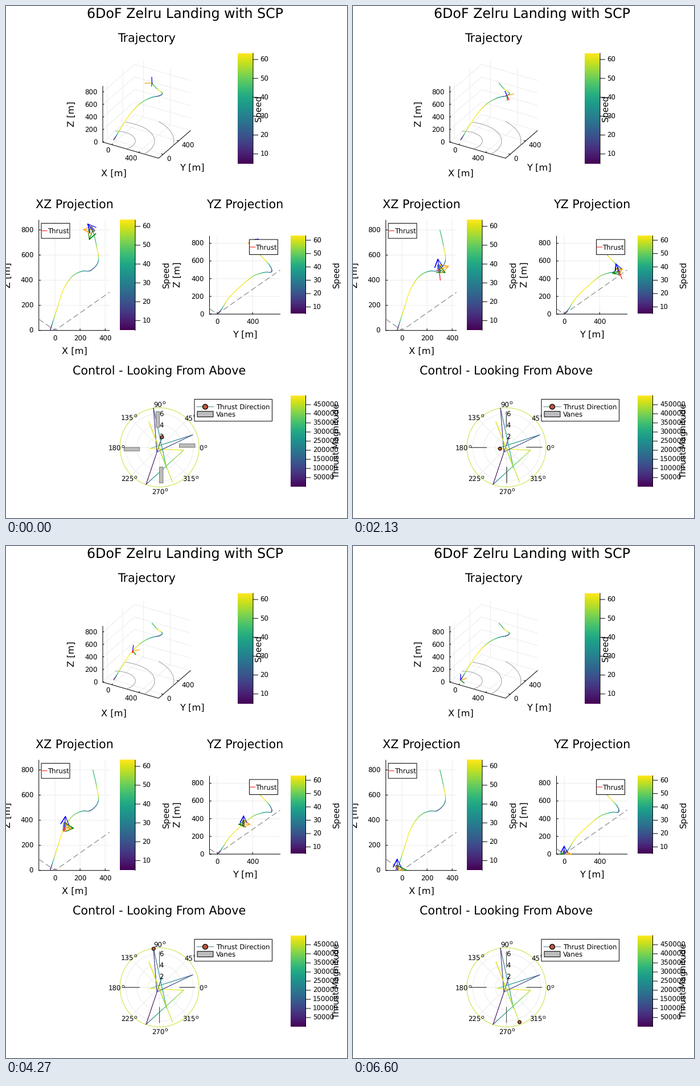
Recreate the animation shown at these times as a matplotlib script. Size 599 by 899 pixels, loop 6670 ms.

```python
import numpy as np
import matplotlib.pyplot as plt
from matplotlib.animation import FuncAnimation
from matplotlib.collections import LineCollection
from matplotlib.patches import Circle, Polygon, Rectangle

W, H, FRAMES = 599, 899, 100
LAST = FRAMES - 1
PX = 0.72  # points per pixel at 100 dpi
GRID, GRAY, RUST = "#ececec", "#bdbdbd", "#bf573d"
AXIS_LEN = 90

plt.rcParams.update({"font.family": "DejaVu Sans", "text.hinting": "none",
                     "path.snap": False})
fig = plt.figure(figsize=(W / 100, H / 100), dpi=100, facecolor="white")
ax = fig.add_axes([0, 0, 1, 1])
ax.axis("off")
viridis = plt.get_cmap("viridis")


# ---------- drawing helpers (pixel coordinates, y down) ----------
def line(xs, ys, color="black", width=1.0, z=2, **kw):
    return ax.plot(xs, ys, color=color, lw=width * PX, zorder=z, **kw)[0]


def text(x, y, s, size=11.8, ha="center", rot=0, z=6):
    """Place text with the middle of its capitals at (x, y)."""
    shift = 0.365 * size
    if rot:
        x += shift
    else:
        y += shift
    return ax.text(x, y, s, fontsize=size * PX, ha=ha, va="baseline", rotation=rot,
                   rotation_mode="anchor", zorder=z)


def box(x, y, w, h, z=8, face="white", edge="black", width=1.0):
    return ax.add_patch(Rectangle((x, y), w, h, fc=face, ec=edge, lw=width * PX, zorder=z))


def circle(x, y, r, face="none", edge="black", width=1.0, z=2):
    return ax.add_patch(Circle((x, y), r, fc=face, ec=edge, lw=width * PX, zorder=z))


def gradient_line(pts, values, clip=None):
    segs = np.stack([pts[:-1], pts[1:]], axis=1)
    colors = viridis((values[:-1] + values[1:]) / 2)
    lc = LineCollection(segs, colors=colors, linewidths=1.1 * PX, zorder=3,
                        capstyle="round")
    ax.add_collection(lc)
    if clip is not None:
        lc.set_clip_path(clip)


def colorbar(x, y0, y1, low, high, ticks, label, label_x):
    ax.imshow(np.linspace(0, 1, 256)[:, None], cmap="viridis", origin="lower",
              extent=(x, x + 27, y1, y0), aspect="auto", zorder=2)
    right = x + 27
    line([right, right], [y0, y1], z=3)
    for v in ticks:
        y = y1 - (v - low) / (high - low) * (y1 - y0)
        line([right, right + 8.5], [y, y], z=3)
        text(right + 12.5, y, str(v), ha="left")
    text(label_x, (y0 + y1) / 2, label, 15, rot=90)


def speed_bar(x, y0, y1, label_x):
    colorbar(x, y0, y1, 4.8, 63.3, range(10, 61, 10), "Speed", label_x)


# ---------- flight model ----------
# waypoints at equal time steps
WAYPOINTS = np.array([
    (302, 400, 800), (330, 479, 677), (345, 592, 551), (285, 614, 478), (214, 532, 471),
    (137, 410, 430), (68, 280, 327), (22, 138, 190), (-21, 49, 55), (-38, 0, 0)], float)
SLOPES = np.gradient(WAYPOINTS, axis=0)
STEPS = len(WAYPOINTS) - 1


def position(t):
    """Cubic Hermite spline through the waypoints, t from 0 to LAST."""
    s = np.atleast_1d(t) * STEPS / LAST
    i = np.minimum(s.astype(int), STEPS - 1)
    u = (s - i)[:, None]
    p0, p1, m0, m1 = WAYPOINTS[i], WAYPOINTS[i + 1], SLOPES[i], SLOPES[i + 1]
    return ((2 * u**3 - 3 * u**2 + 1) * p0 + (u**3 - 2 * u**2 + u) * m0
            + (3 * u**2 - 2 * u**3) * p1 + (u**3 - u**2) * m1)


def attitude(t):
    """Orthonormal rows: green, orange and blue body axes."""
    yaw = np.radians(np.interp(t, [0, 13, 53, 99], [-143, 18, 52, 60]))
    lean_x = np.interp(t, [0, 53, 99], [-.45, .13, 0])
    lean_y = np.interp(t, [0, 32, 87, 99], [.72, -.4, .32, 0])
    up = np.array([lean_x, lean_y, np.sqrt(1 - lean_x**2 - lean_y**2)])
    side = np.array([np.cos(yaw), np.sin(yaw), 0])
    side -= side.dot(up) * up
    side /= np.linalg.norm(side)
    return np.array([np.cross(side, up), side, up])


def thrust(t):
    return np.interp(t, [0, 13, 32, 53, 74, 87, 97], [0, 85, 92, 32, 30, 72, 0])


# ---------- projections ----------
def view3d(p):
    x, y, z = np.asarray(p, float).T
    return np.stack([193.5 + .1187 * x + .0678 * y,
                     236.6 + .0343 * x - .0587 * y - .11 * z], axis=-1)


def view_xz(p):
    p = np.asarray(p, float)
    return np.stack([86 + .2206 * p[..., 0], 569.7 - .2206 * p[..., 2]], axis=-1)


def view_yz(p):
    p = np.asarray(p, float)
    return np.stack([371 + .1555 * p[..., 1], 541 - .1555 * p[..., 2]], axis=-1)


TIMES = np.linspace(0, LAST, 200)
PATH = position(TIMES)
RATE = np.linalg.norm(np.gradient(PATH, TIMES * STEPS / LAST, axis=0), axis=1)
PATH_VAL = .22 + .0072 * (RATE - 82)

# ---------- titles ----------
text(314.5, 12.7, "6DoF Zelru Landing with SCP", 23.7)
for x, y, s in [(247, 56.3, "Trajectory"), (120, 348.3, "XZ Projection"),
                (420, 348.3, "YZ Projection"), (269.5, 640, "Control - Looking From Above")]:
    text(x, y, s, 20.6)

# ---------- trajectory in space ----------
X0, X1, Y0, Y1, Z1 = -131, 695, -117, 709, 891


def line3d(pts, color="black", z=2):
    q = view3d(pts)
    line(q[:, 0], q[:, 1], color, 1, z)


for z in range(0, 801, 200):
    line3d([(X0, Y0, z), (X0, Y1, z), (X1, Y1, z)], GRID, 1)
    line3d([(X0, Y0, z), (X0 + 15, Y0, z + 10)])
    text(161, 239.3 - .11 * z, str(z), ha="right")
for v in (0, 400):
    line3d([(v, Y0, 0), (v, Y1, 0), (v, Y1, Z1)], GRID, 1)
    line3d([(X1, v, 0), (X0, v, 0), (X0, v, Z1)], GRID, 1)
    line3d([(v, Y0, 0), (v, Y0 + 22, 0)])
    line3d([(X1, v, 0), (X1 - 22, v, 0)])
    text(183 + .1187 * v, 253.5 + .0343 * v, str(v), ha="right")
    text(282.5 + .066 * v, 268.5 - .0595 * v, str(v), ha="left")
line3d([(X0, Y0, Z1), (X0, Y0, 0), (X1, Y0, 0), (X1, Y1, 0)])

theta = np.linspace(-np.pi, np.pi, 361)
for r in (247, 494, 742):
    cx, cy = r * np.cos(theta), r * np.sin(theta)
    cx[(cx < X0) | (cx > X1) | (cy < Y0) | (cy > Y1)] = np.nan
    line3d(np.stack([cx, cy, 0 * cx], axis=1), "#a0a0a0")

text(189, 293, "X [m]", 16.2)
text(327, 283, "Y [m]", 16.2)
for x, y in [(114, 190), (1.5, 472.5), (300, 472)]:
    text(x, y, "Z [m]", 16.2, rot=90)
gradient_line(view3d(PATH), PATH_VAL)
speed_bar(407, 83, 277, 442)


# ---------- flat projections ----------
def flat_panel(x0, x1, y0, y1, view, xticks, name):
    clip = Rectangle((x0, y0), x1 - x0, y1 - y0 + .5, transform=ax.transData)
    for v in xticks:
        x = view((v, v, 0))[0]
        line([x, x], [y0, y1], GRID, z=1)
        line([x, x], [y1, y1 - 3])
        text(x, y1 + 13.8, str(v))
    for v in range(0, 801, 200):
        y = view((0, 0, v))[1]
        line([x0, x1], [y, y], GRID, z=1)
        line([x0, x0 + 3], [y, y])
        text(x0 - 9.5, y + .3, str(v), ha="right")
    line([x0, x0, x1], [y0, y1, y1])
    # glide slope limit
    origin = view((0, 0, 0))[0]
    xs = np.array([x0, origin, x1])
    line(xs, y1 - .7 * abs(xs - origin), "#808080", 1.1, dashes=(9, 4.5))
    gradient_line(view(PATH), PATH_VAL, clip)
    text((x0 + x1) / 2 + .5, y1 + 35.2, name, 16.2)
    return clip


clip_xz = flat_panel(57.7, 181.7, 376, 569.7, view_xz, (0, 200, 400), "X [m]")
clip_yz = flat_panel(357.5, 481.5, 404, 541, view_yz, (0, 400), "Y [m]")
speed_bar(200, 376, 569.5, 280)
speed_bar(499.5, 403.5, 540.5, 579.5)


def thrust_legend(x, y):
    return [box(x, y, 50, 26.5),
            line([x + 1.5, x + 10], [y + 13.2, y + 13.2], "red", 1, 9),
            text(x + 11, y + 13.2, "Thrust", ha="left", z=9)]


thrust_legend(62, 381.5)
legends = [thrust_legend(427.5, 410), thrust_legend(361, 410)]

# ---------- control panel ----------
CX, CY, R = 269.7, 775, 69.5
for v in (2, 4, 6):
    circle(CX, CY, 9.9 * v, edge=GRID, z=1)
    text(CX - .5, CY + .7 - 9.9 * v, str(v), ha="left")
for deg in range(0, 360, 45):
    c, s = np.cos(np.radians(deg)), np.sin(np.radians(deg))
    line([CX, CX + R * c], [CY, CY - R * s], GRID, z=1)
    x, y = 267 + 76.3 * c, 777 - 76.3 * s
    text(x, y, str(deg))
    text(x + 3.8 * len(str(deg)), y - 5, "o", 9.4, ha="left")
circle(CX, CY, R, edge=viridis(.9), width=.9)

# thrust direction and relative magnitude at equal time steps
AIM = np.array([(274, 757), (246, 840), (312, 780), (253, 777), (328, 753), (265, 783),
                (259, 706), (282, 811), (251, 730), (292.5, 836)], float)
POWER = [.15, .02, .9, 1, .3, .2, .12, .65, .97, .9]
u = np.linspace(0, 1, 20)
for i in range(STEPS):
    gradient_line(AIM[i] + u[:, None] * (AIM[i + 1] - AIM[i]),
                  POWER[i] + u**.4 * (POWER[i + 1] - POWER[i]))

colorbar(499.5, 684, 844, 0, 500000, range(50000, 450001, 50000),
         "Thrust Magnitude", 579.5)

box(331, 690.5, 136.5, 38.5)
line([335, 365], [703.7, 703.7], "#4d7f86", 1, 9)
circle(350, 703.7, 4.4, RUST, width=1.3, z=10)
text(369, 704, "Thrust Direction", ha="left", z=9)
box(336, 711.7, 28, 9.8, 9, GRAY)
text(369, 717, "Vanes", ha="left", z=9)

# ---------- moving parts ----------
COLORS = ["green", "orange", "blue"]
dot = circle(0, 0, 2.9, RUST, width=1.1, z=7)
vanes = [box(0, 0, 1, 1, 5, GRAY, "#505050", .7) for _ in range(4)]
arms3d = [line([], [], c, 1.3, 4) for c in COLORS + ["red"]]


class Craft:
    """Rocket body, body axes and thrust in one flat panel."""

    def __init__(self, view, clip, head):
        self.view, self.head = view, head
        self.body = ax.add_patch(Polygon(np.zeros((4, 2)), fc="#a8a8a8", ec="#505050",
                                         lw=.9 * PX, zorder=4))
        self.arrows = [line([], [], c, 1.15, 5) for c in COLORS]
        self.thrust = line([], [], "red", 1.15, 5)
        for art in [self.body, self.thrust] + self.arrows:
            art.set_clip_path(clip)

    def arrow(self, art, tail, tip):
        back = np.arctan2(*(tail - tip)[::-1])
        wings = [tip + self.head * np.array([np.cos(back + a), np.sin(back + a)])
                 for a in (.47, -.47)]
        art.set_data(*np.array([tail, tip, wings[0], tip, wings[1]]).T)

    def update(self, pos, axes, flame):
        tail = self.view(pos)
        for art, axis in zip(self.arrows, axes):
            self.arrow(art, tail, self.view(pos + AXIS_LEN * axis))
        self.thrust.set_data(*np.array([tail, self.view(pos + flame)]).T)
        low, high = self.view(pos - 22 * axes[2]), self.view(pos + 40 * axes[2])
        d = high - low
        side = np.array([-d[1], d[0]]) / np.hypot(*d) * self.head * .14
        self.body.set_xy([low - side, low + side, high + side, high - side])


crafts = [Craft(view_xz, clip_xz, 15.6), Craft(view_yz, clip_yz, 12.8)]


def update(n):
    t = min(LAST, n * LAST / (LAST - 1))  # touch down just before the loop ends
    pos, axes = position(t)[0], attitude(t)
    flame = -thrust(t) * axes[2]
    for craft in crafts:
        craft.update(pos, axes, flame)
    for art, vec in zip(arms3d, [*(AXIS_LEN * axes), flame]):
        art.set_data(*view3d([pos, pos + vec]).T)

    # the legend jumps to the free corner
    left = 5 <= n < 20
    for legend, shown in zip(legends, (not left, left)):
        for art in legend:
            art.set_visible(shown)

    s = np.interp(t, [0, 74, LAST], [0, 6.88, STEPS])
    dot.center = [np.interp(s, range(STEPS + 1), AIM[:, k]) for k in (0, 1)]

    # vanes turn edge-on
    w = 6.2 * np.exp(-.0705 * t)
    vanes[0].set_bounds(CX - w, 712, w, 28)
    vanes[1].set_bounds(CX, 809.5, w, 28)
    vanes[2].set_bounds(304.5, CY - w, 27.5, w)
    vanes[3].set_bounds(207.3, CY, 27.5, w)
    return []


ax.set_xlim(0, W)
ax.set_ylim(H, 0)
anim = FuncAnimation(fig, update, frames=FRAMES, interval=66.7, repeat=True,
                     repeat_delay=0, init_func=lambda: update(0), blit=False)
plt.show()
```
